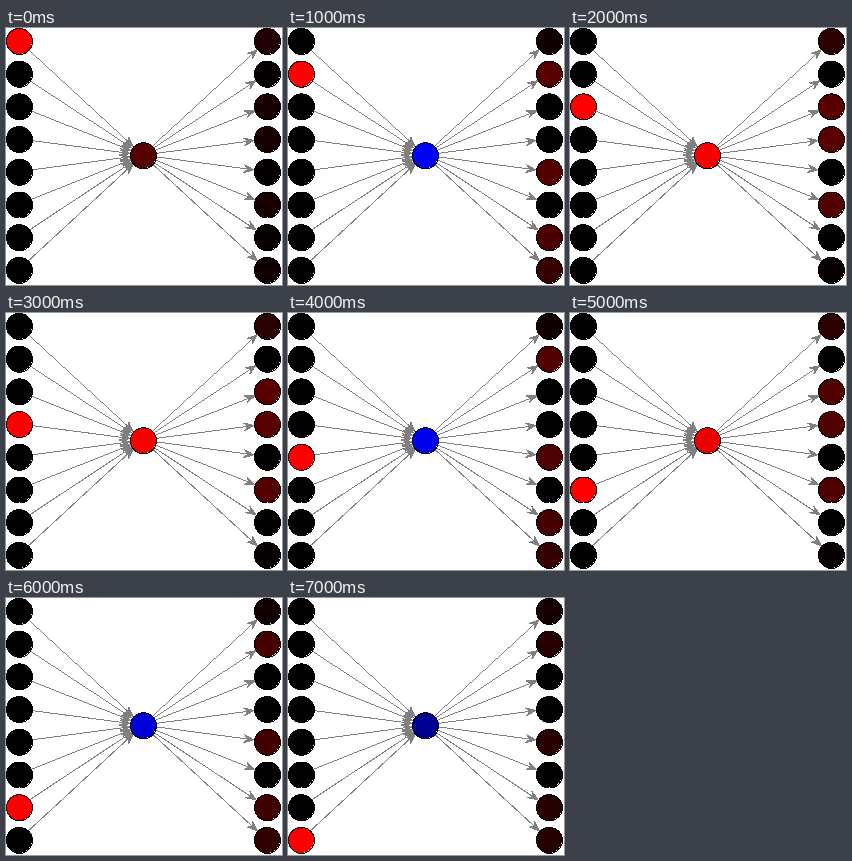
An HTML page that plays this animation: 276 px wide and 257 px high, repeating every 8000 ms.

```html
<!DOCTYPE html>
<html lang="en">
<head>
<meta charset="utf-8">
<title>Network with one hidden node</title>
<style>
  html, body { margin: 0; width: 100%; height: 100%; overflow: hidden; background: #fff; }
  svg { display: block; width: 276px; height: 257px; shape-rendering: crispEdges; }
</style>
</head>
<body>
<svg id="stage" viewBox="0 0 276 257"></svg>
<script>
const STEP_MS = 1000, RADIUS = 13, GRAY = '#808080';
const HEAD = { length: 10, halfWidth: 4, notch: 4 };
const LEFT = 13, RIGHT = 261, TOP = 13, SPACING = 32.7;
const HIDDEN = { x: 137, y: 127.3 };

// Hidden activation caused by each input; the output weights grow from the same values.
const activations = [0.34, -0.96, 0.97, 0.97, -0.93, 0.92, -0.84, -0.57];
const weights = activations.map(a => 2.7 * Math.sign(a) * Math.abs(a) ** 1.5);

const sigmoid = x => 1 / (1 + Math.exp(-x));
const output = (weight, hidden) => sigmoid(weight * hidden - 1.85 - 0.5 * Math.abs(weight));

// Positive values glow red, negative ones blue.
function colour(value) {
  const level = Math.round(255 * Math.abs(value));
  return value < 0 ? `rgb(0,0,${level})` : `rgb(${level},0,0)`;
}

function add(parent, tag, attributes = {}) {
  const element = document.createElementNS('http://www.w3.org/2000/svg', tag);
  for (const name in attributes) element.setAttribute(name, attributes[name]);
  return parent.appendChild(element);
}

const stage = document.getElementById('stage');
const edges = add(stage, 'g', { stroke: GRAY, fill: GRAY, transform: 'translate(-0.2 -0.2)' });

function arrow(from, to) {
  const dx = to.x - from.x, dy = to.y - from.y;
  const angle = Math.atan2(dy, dx) * 180 / Math.PI;
  const tip = Math.hypot(dx, dy) - RADIUS, back = tip - HEAD.length;
  const group = add(edges, 'g', { transform: `translate(${from.x} ${from.y}) rotate(${angle})` });
  add(group, 'path', { d: `M${RADIUS},0H${back + HEAD.notch}` });
  add(group, 'path', {
    d: `M${tip},0L${back},${HEAD.halfWidth}L${back + HEAD.notch},0L${back},${-HEAD.halfWidth}Z`
  });
}

// The outline sits half a pixel below and right of the fill.
function node({ x, y }) {
  const fill = add(stage, 'circle', { cx: x, cy: y, r: RADIUS });
  add(stage, 'circle', { cx: x + 0.5, cy: y + 0.5, r: RADIUS, fill: 'none', stroke: '#000' });
  return fill;
}

const column = x => activations.map((_, i) => ({ x, y: TOP + i * SPACING }));
const inputs = column(LEFT), outputs = column(RIGHT);
inputs.forEach(point => arrow(point, HIDDEN));
outputs.forEach(point => arrow(HIDDEN, point));
const inputNodes = inputs.map(node);
const outputNodes = outputs.map(node);
const hiddenNode = node(HIDDEN);

function draw(time) {
  const step = Math.floor(time / STEP_MS) % activations.length;
  const hidden = activations[step];
  const paint = (circle, value) => circle.setAttribute('fill', colour(value));
  inputNodes.forEach((circle, i) => paint(circle, i === step ? 1 : 0));
  outputNodes.forEach((circle, i) => paint(circle, output(weights[i], hidden)));
  paint(hiddenNode, hidden);
}

function frame() {
  draw(performance.now());
  requestAnimationFrame(frame);
}
frame();
</script>
</body>
</html>
```
